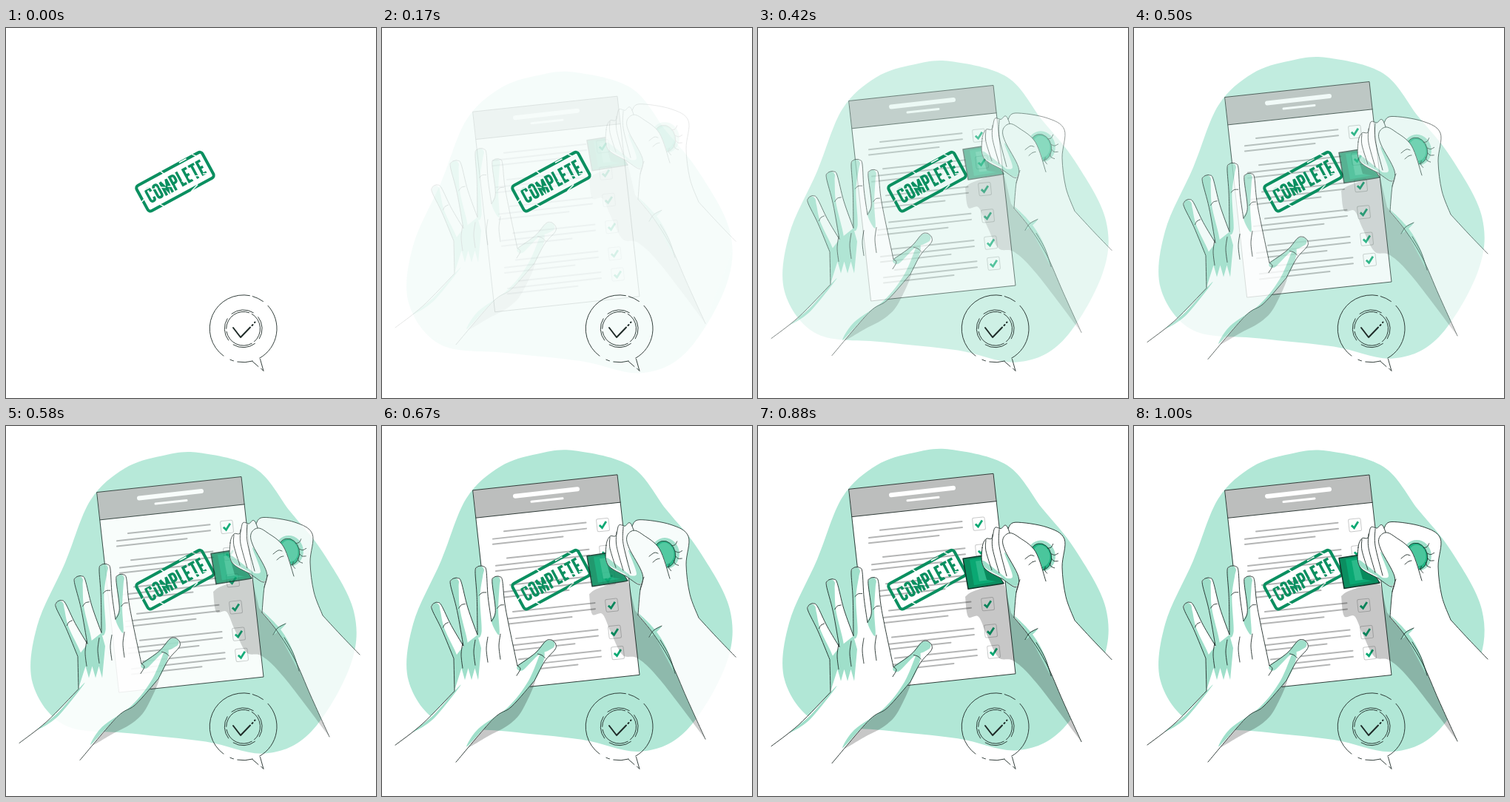
Animation, 500 px wide and 500 px high, one loop 1040 ms. Source, as an HTML page:

```html
<!DOCTYPE html>
<html lang="en">
<head>
<meta charset="utf-8">
<title>Complete</title>
<style>
html, body { margin: 0; width: 100%; height: 100%; overflow: hidden; background: #fff; }
svg { display: block; width: 100vw; height: 100vh; }
.ink { fill: none; stroke: #1f2b28; stroke-width: .9; stroke-linecap: round; stroke-linejoin: round; }
.skin { fill: #fff; }
.shade { fill: #9fdfca; }
.shadow { fill: #000; opacity: .22; }
.rule { stroke: #b4b5b5; stroke-width: 2; stroke-linecap: round; }
.title { stroke: #fff; stroke-linecap: round; }
.check { fill: none; stroke: #0ba873; stroke-width: 2.8; }
</style>
</head>
<body>
<svg id="stage" viewBox="0 0 500 500" xmlns="http://www.w3.org/2000/svg"></svg>
<script>
const LOOP = 1040, FPS = 24, DROP = 30;

const mix = (a, b, k) => a.map((v, i) => v + (b[i] - v) * k);
const mid = (a, b) => mix(a, b, .5);
const polar = (c, r, deg) => [c[0] + r * Math.cos(deg * Math.PI / 180), c[1] + r * Math.sin(deg * Math.PI / 180)];

// Smooth curve through points
function curve(p, closed = false, join = false) {
  const n = p.length;
  const at = i => p[closed ? (i + n) % n : Math.max(0, Math.min(n - 1, i))];
  let d = (join ? 'L' : 'M') + p[0];
  for (let i = 0; i < (closed ? n : n - 1); i++) {
    const [a, b, c, e] = [-1, 0, 1, 2].map(k => at(i + k));
    const c1 = b.map((v, k) => v + (c[k] - a[k]) / 6);
    const c2 = c.map((v, k) => v - (e[k] - b[k]) / 6);
    d += `C${c1} ${c2} ${c}`;
  }
  return d + (closed ? 'Z' : '');
}
// Curves meeting at sharp corners
const chain = parts => parts.map((p, i) => curve(p, false, i > 0)).join('');
const path = (d, cls, extra = '') => `<path class="${cls}" d="${d}" ${extra}/>`;
const blot = (cls, p) => path(curve(p, true), cls);
const line = (cls, a, b, extra = '') => path(`M${a}L${b}`, cls, extra);
const arc = (c, r, from, to) =>
  `M${polar(c, r, from)}A${r} ${r} 0 ${to - from > 180 ? 1 : 0} 1 ${polar(c, r, to)}`;

function blob() {
  return path(curve([
    [260, 33.5], [337, 55], [384, 113], [428, 168], [470, 248], [465, 322], [412, 411], [350, 440],
    [270, 424], [170, 413], [80, 402], [36, 345], [42, 268], [80, 182], [114, 98], [160, 55], [210, 38]
  ], true), '', 'fill="#b1e7d6"');
}

function paper() {
  const [tl, tr, br, bl] = [[123, 87], [318, 66], [348, 336.5], [153, 357.5]];
  const [hl, hr] = [mix(tl, bl, .138), mix(tr, br, .138)];
  const sheet = `M${tl}L${tr}L${br}L${bl}Z`;
  let s = path(sheet, 'skin') + path(`M${tl}L${tr}L${hr}L${hl}Z`, '', 'fill="#bcbebd"') +
    path(sheet + `M${hl}L${hr}`, 'ink') +
    line('title', [180, 95], [264, 85.5], 'stroke-width="6"') +
    line('title', [202, 102.5], [244, 98], 'stroke-width="3"');
  for (let i = 0; i < 6; i++) {
    const y = i < 5 ? i * 36.2 : 173;
    s += `<g transform="translate(${i * 4} ${y})">` +
      line('rule', [165, 142.5], [275.5, 130.7]) + line('rule', [150, 152.8], [276, 138.8]) +
      line('rule', [150, 160], [244.5, 149.6]) +
      '<g transform="translate(298.3 133.8) rotate(-6)">' +
      '<rect x="-8" y="-8.5" width="16.5" height="17" rx="2" fill="none" stroke="#c9caca"/>' +
      '<path class="check" d="M-4.5 0L-1.2 3.8L5 -4"/></g></g>';
  }
  return s;
}

// A finger rises from two knuckles a, b to a rounded tip
function finger(a, b, tip, width) {
  const root = mid(a, b);
  const len = Math.hypot(root[0] - tip[0], root[1] - tip[1]);
  const u = [(root[0] - tip[0]) / len, (root[1] - tip[1]) / len];
  const side = (along, off) => [tip[0] + u[0] * along + u[1] * off, tip[1] + u[1] * along - u[0] * off];
  const h = width / 2;
  const left = side(7, -h), right = side(7, h);
  return {
    edge: [a, side(len * .5, -h), left, side(1, -h * .55), tip, side(1, h * .55), right, side(len * .5, h), b],
    shade: [a, side(len * .5, -h), left, tip, side(5, h * .6), side(14, h * .3), side(len * .5, -h * .45), mix(a, b, .3)],
    crease: [side(len * .47, -h * .6), side(len * .43, 0), side(len * .43, h * .7)]
  };
}

function leftHand() {
  const knuckles = [[97, 314], [110, 297], [129, 282], [148, 264], [183, 324], [206, 344]];
  const tips = [[71, 239], [98, 205.5], [133, 189], [155, 203], [232, 291]];
  const widths = [14, 15, 15, 14, 17];
  const fingers = tips.map((tip, i) => finger(knuckles[i], knuckles[i + 1], tip, widths[i]));
  const wrist = [[206, 344], [175, 379], [150, 396], [100, 454]];
  const outline = chain([
    [[18, 431], [55, 402], [98, 358]], [[98, 358], knuckles[0]],
    ...fingers.map(f => f.edge), wrist
  ]);
  const tendons = [0, 1, 2, 3].map(i => {
    const x = 107 + i * 17, y = 306 - i * 4;
    return curve([[x + 2, y - 13], [x, y + 3], [x + 2, y + 21]]);
  }).join('');
  // ragged lower edge of the palm shade
  const rag = [0, 1, 2, 3, 4, 5].map(i => [130 - i * 4.5, i % 2 ? 327 : 343]);
  return blot('shadow', [[114, 434], [158, 389], [206, 342], [190, 383], [172, 403], [145, 418]]) +
    path(outline, 'skin') +
    fingers.map(f => blot('shade', f.shade)).join('') +
    path(`M${[knuckles[0], knuckles[1], knuckles[2], [134, 300], ...rag, [98, 357]].join('L')}Z`, 'shade') +
    blot('shade', [...wrist.slice(0, 3), [115, 433], [130, 409], [170, 380], [198, 344], [216, 303], [219, 315]]) +
    blot('shade', [[42, 413], [70, 390], [98, 358], [105, 352], [70, 395]]) +
    path(outline + tendons + fingers.map(f => curve(f.crease)).join('') +
      curve([[183, 324], [187, 328], [182, 337]]), 'ink');
}

function rightHand() {
  const fist = [[338, 138], [348, 129.5], [390, 136], [414, 152], [411, 190], [416, 230], [428, 262]];
  const forearm = [[437, 426], [412, 371], [390, 321], [367, 284], [346, 258]];
  const palm = [[346, 258], [349, 224], [354, 207]];
  const thumb = [[349, 224], [352, 203], [334, 168], [331, 152], [340, 144], [353, 150], [375, 169], [389, 209]];
  const grip = [[303, 164], [308, 152], [316, 151], [320, 137], [328, 138], [338, 138], [354, 200], [349, 217], [330, 206], [305, 190]];
  const hub = [382, 176];
  const knob = (rx, ry, fill, shift = 0) => `<ellipse cx="${hub[0] + shift}" cy="${hub[1] - shift}" rx="${rx}" ry="${ry}" ` +
    `transform="rotate(-12 ${hub})" fill="${fill}"`;
  // folds of skin around the knob
  const folds = [-50, -15, 10, 35, 65].map(a =>
    curve([polar(hub, 15, a), polar(hub, 19, a + 8), polar(hub, 24, a + 4)])).join('');
  const quad = (fill, ...p) => path(`M${p.join('L')}Z`, '', `fill="${fill}"`);
  const strips = [0, 1, 2].map(i =>
    curve([[308 + i * 9, 153 - i * 7], [308 + i * 9, 168 - i * 3], [316 + i * 10, 194 + i * 4]])).join('');
  return path(curve([[280, 230], [290, 223], [318, 214], [333, 214]]) +
      curve([[342, 252], ...forearm.slice(0, 4).reverse()], false, true) +
      curve([[437, 426], [376, 346], [346, 317], [325, 312], [309, 281], [298, 257], [284, 257], [280, 230]], false, true),
      'shadow') +
    path('M277 178.500L306 174L332 212L284 219.500Z', '', 'fill="#0b8e60" stroke="#13352a" stroke-linejoin="round" stroke-width="1.500"') +
    quad('#0aa873', [286, 180], [306, 177], [329, 208], [292, 214.5]) +
    quad('#2cba8a', [294, 182], [306, 180], [316, 207], [299, 209]) +
    quad('#098a5d', [301, 178], [308, 176], [331, 211], [309, 207]) +
    path(chain([fist, [[428, 262], [452, 288], [478, 315]], [[478, 315], [437, 426]], forearm, palm, [[354, 207], [338, 138]]]), 'skin') +
    knob(19, 21, '#9fdfca', 1) + '/>' +
    knob(14.5, 18, '#20b282') + ' stroke="#123c2e" stroke-width=".9"/>' +
    knob(11.5, 14.5, '#4ac69c', 1) + '/>' +
    blot('shade', [[346, 256], [367, 276], [384, 302], [396, 337], [367, 284]]) +
    blot('shade', [[361, 288], [366, 279], [378, 273], [371, 281]]) +
    blot('skin', grip) +
    blot('shade', [[333, 170], [353, 200], [349, 216], [328, 204], [344, 203]]) +
    blot('shade', [[304, 181], [318, 191], [336, 206], [307, 191]]) +
    path(curve(grip, true) + strips, 'ink') +
    blot('skin', [...thumb, [390, 235], [365, 250]]) +
    path(curve(thumb) + chain([fist, [[428, 262], [452, 288], [478, 315]]]) + curve(forearm) + curve(palm) + folds +
      curve([[361, 179], [368, 174], [373, 175]]) + curve([[366, 187], [371, 183], [375, 182]]) +
      curve([[361, 288], [367, 279], [378, 273]]) + curve([[376, 292], [388, 313], [396, 337]]), 'ink');
}

// Condensed stroke lettering, 6 wide and 18 tall
function lettering(word) {
  const glyph = {
    C: 'M6 -4V-6Q6 -9 3 -9T0 -6V6Q0 9 3 9T6 6V4',
    O: 'M0 -6Q0 -9 3 -9T6 -6V6Q6 9 3 9T0 6Z',
    M: 'M0 11V-9L4.500 6L9 -9V11',
    P: 'M0 11V-9H3Q6 -9 6 -6V-2Q6 1 3 1H0',
    L: 'M0 -11V9H5.500',
    E: 'M5.500 -9H0V9H5.500M0 0H5',
    T: 'M-1.500 -9H7.500M3 -9V11'
  };
  const advance = { M: 14.5, L: 9.5, E: 9.7 };
  let x = -41;
  return [...word].map(ch => {
    const g = `<path transform="translate(${x} 0)" d="${glyph[ch]}"/>`;
    x += advance[ch] || 11.3;
    return g;
  }).join('');
}

function imprint() {
  let seed = 7;
  const random = () => (seed = seed * 16807 % 2147483647) / 2147483647;
  let wear = 'M-12 -25L-8 -16M17 -20H28M36 -24L42 -16M-34 15L-27 25M13 22L25 18M-54 3L-46 0';
  for (let i = 0; i < 9; i++) {
    const x = -42 + i * 10, y = random() * 20 - 10;
    wear += `M${x} ${y}l${4 + random() * 4} ${random() * 8 - 2}`;
  }
  return '<mask id="wear" maskUnits="userSpaceOnUse" x="-60" y="-30" width="120" height="60">' +
    '<rect x="-60" y="-30" width="120" height="60" fill="#fff"/>' +
    `<path d="${wear}" stroke="#000" stroke-width="1.500"/></mask>` +
    '<g role="img" aria-label="COMPLETE" transform="translate(228.500 207.700) rotate(-28.500)">' +
    '<g mask="url(#wear)" fill="none" stroke="#0b8f60" stroke-width="3.500">' +
    `<rect x="-50.500" y="-19.500" width="101" height="39" rx="4" stroke-width="4"/>${lettering('COMPLETE')}</g></g>`;
}

function bubble() {
  const c = [320.7, 406.3];
  const rim = [[126, 281], [286, 306], [317, 421], [107, 113], [74, 100]];
  const quarters = [0, 90, 180, 270].map(a => arc(c, 25.5, a - 38, a + 32));
  const inner = [60, 180, 300].map(a => arc(c, 23, a, a + 110));
  return path(rim.map(([from, to]) => arc(c, 45.5, from, to)).join('') + quarters.join('') + inner.join('') +
      'M333 450.500L341 457.500M343.500 447.500L348 463.500L344.500 460', 'ink') +
    path('M307 405L317 418L330 404.500M332.500 402L333.500 401M336 398L336.500 397.500', 'ink', 'style="stroke-width:2"');
}

const layer = (id, body) => `<g id="${id}">${body}</g>`;
document.getElementById('stage').innerHTML = layer('blob', blob()) + layer('paper', paper()) +
  layer('left', leftHand()) + imprint() + layer('right', rightHand()) + bubble();

function bezier(x1, y1, x2, y2) {
  const f = (s, a, b) => 3 * (1 - s) * (1 - s) * s * a + 3 * (1 - s) * s * s * b + s * s * s;
  return t => {
    let lo = 0, hi = 1;
    for (let i = 0; i < 30; i++) {
      const s = (lo + hi) / 2;
      if (f(s, x1, x2) < t) lo = s; else hi = s;
    }
    return f(lo, y1, y2);
  };
}

const bounce = bezier(.36, -.01, .5, 1.38), settle = bezier(.36, 0, .56, 1.2);
const moves = [['blob', 1, bounce], ['paper', 1, bounce], ['left', -1, bounce], ['right', -1, settle]]
  .map(([id, dir, ease]) => ({ el: document.getElementById(id), dir, ease }));

// Motion advances in film steps; nothing shows before the second one
function draw(now) {
  const step = Math.floor((now % LOOP + 5) * FPS / 1000);
  const t = step < 2 ? 0 : Math.min(1, (step + .5) / FPS);
  for (const { el, dir, ease } of moves) {
    const y = ease(t);
    el.setAttribute('transform', `translate(0 ${(dir * DROP * (1 - y)).toFixed(2)})`);
    el.setAttribute('opacity', Math.max(0, Math.min(1, y)).toFixed(3));
  }
}

const start = performance.now();
function tick() {
  draw(performance.now() - start);
  requestAnimationFrame(tick);
}
tick();
</script>
</body>
</html>
```
